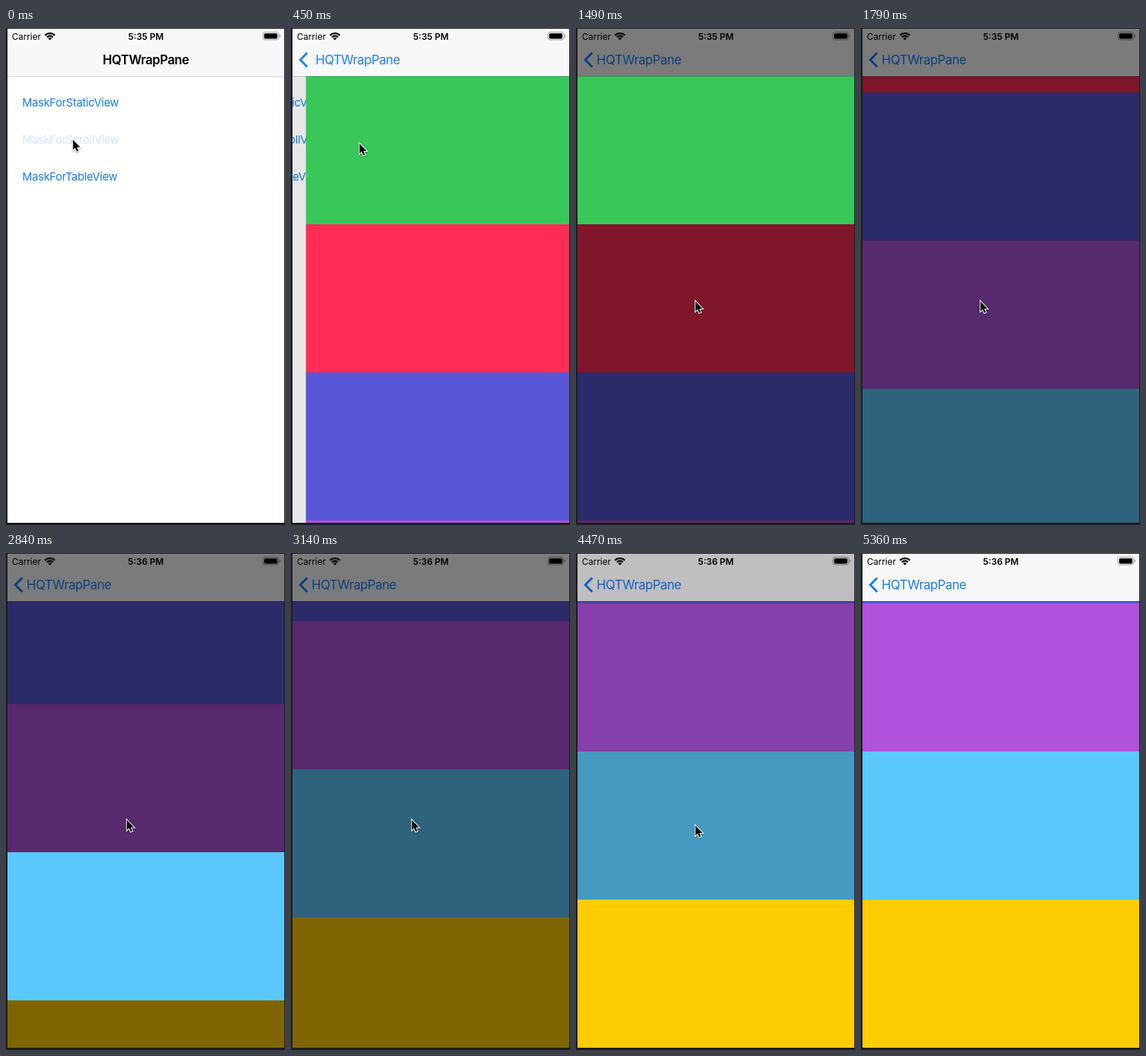
Recreate the animation shown at these times as an HTML page with a canvas. Size 378 by 671 pixels, loop 5.81 s.

```html
<!DOCTYPE html>
<html lang="en">
<head>
<meta charset="utf-8">
<title>Mask demo</title>
<style>
  html, body { margin: 0; width: 100%; height: 100%; overflow: hidden; background: #1c1c1e; }
  canvas { display: block; }
</style>
</head>
<body>
<canvas id="stage" width="378" height="671"></canvas>
<script>
const ctx = document.getElementById('stage').getContext('2d');

const LOOP = 5810, TICK = 150;
const SHORT_TICKS = [900, 2990, 3580, 4620]; // these ticks last 10 ms less
const SCREEN = { x: 2, y: 1, w: 375, h: 667 };
const NAV_BOTTOM = 65, ROW = 200;
const TITLE = 'HQTWrapPane';
const BUTTONS = ['MaskForStaticView', 'MaskForScrollView', 'MaskForTableView'];
const ROW_COLORS = ['#3ac759', '#ff2d55', '#5856d6', '#af52de', '#5bc8fc', '#fecc03'];
const BLUE = '#157efb', BAR = '#f8f7f9';

// Pointer keys: tick, x, y
const POINTER = [
  [0, 90, 150], [1, 91, 152], [5, 93, 158], [6, 108, 205], [7, 142, 310], [8, 160, 366],
  [9, 160, 366], [10, 161, 368], [15, 161, 368], [19, 163, 359.5], [23, 163, 359.5],
  [24, 162, 363], [25, 161, 367], [32, 161, 367], [33, 178, 397], [34, 242, 522],
  [35, 324, 650], [36, 360, 700]
];

const clamp = v => Math.max(0, Math.min(1, v));
const mix = (a, b, p) => a + (b - a) * p;
const smooth = v => { const p = clamp(v); return p * p * (3 - 2 * p); };

function tickAt(time) {
  const skipped = SHORT_TICKS.filter(start => time >= start + TICK - 10).length;
  return Math.floor((time + 10 * skipped) / TICK);
}

function pushProgress(tick) {
  if (tick >= 4) return 1;
  const s = Math.max(0, tick - 0.3) * 1.77;
  return 1 - (1 + s) * Math.exp(-s);
}

function scrollAt(tick) {
  return 461 * smooth((tick - 10.54) / 2) + 136 * smooth((tick - 19.54) / 2);
}

function maskAlpha(tick) {
  return 0.5 * (smooth((tick - 3.62) / 1.67) - smooth((tick - 29.12) / 1.67));
}

// Index of the uncovered row, or -1 while the list scrolls
function openRow(tick) {
  if (tick < 11) return 0;
  if (tick < 13) return -1;
  if (tick < 20) return 4;
  return tick < 22 ? -1 : 5;
}

function pointerAt(tick) {
  const next = POINTER.findIndex(key => key[0] >= tick);
  if (next < 0) return [400, 720];
  if (next === 0) return POINTER[0].slice(1);
  const [t0, x0, y0] = POINTER[next - 1], [t1, x1, y1] = POINTER[next];
  const p = (tick - t0) / (t1 - t0);
  return [mix(x0, x1, p), mix(y0, y1, p)];
}

function rect(color, x, y, w, h) {
  ctx.fillStyle = color;
  ctx.fillRect(x, y, w, h);
}

function label(text, x, y, size, { weight = 400, color = '#000', align = 'left', spacing = 0, alpha = 1 } = {}) {
  ctx.save();
  ctx.globalAlpha *= alpha;
  ctx.font = `${weight} ${size}px Inter, sans-serif`;
  ctx.letterSpacing = spacing + 'px';
  ctx.textAlign = align;
  ctx.fillStyle = color;
  ctx.fillText(text, x, y);
  ctx.restore();
}

function roundRect(x, y, w, h, r) {
  ctx.beginPath();
  ctx.roundRect(x, y, w, h, r);
}

function drawMenu(push) {
  ctx.save();
  ctx.translate(-0.3 * SCREEN.w * push, 0);
  rect('#fff', SCREEN.x, SCREEN.y, SCREEN.w, SCREEN.h);
  BUTTONS.forEach((text, i) => label(text, 22, 105.5 + 50 * i, 15, {
    color: BLUE, spacing: -0.25, alpha: i === 1 && push === 0 ? 0.2 : 1
  }));
  rect(`rgba(0,0,0,${0.1 * push})`, SCREEN.x, SCREEN.y, SCREEN.w, SCREEN.h);
  ctx.restore();
}

function drawRows(push, scroll) {
  const x = SCREEN.x + SCREEN.w * (1 - push);
  ROW_COLORS.forEach((color, i) => rect(color, x, Math.round(NAV_BOTTOM + ROW * i - scroll), SCREEN.w, ROW));
}

function drawStatus(clock) {
  label('Carrier', 8, 15.5, 12);
  label(clock, 189.5, 15.5, 12, { weight: 600, align: 'center' });

  ctx.fillStyle = ctx.strokeStyle = '#000';
  ctx.lineWidth = 2.2;
  const from = -Math.PI * 0.75, to = -Math.PI * 0.25;
  for (const r of [5.8, 9.4]) {
    ctx.beginPath();
    ctx.arc(59.5, 16.5, r, from, to);
    ctx.stroke();
  }
  ctx.beginPath();
  ctx.moveTo(59.5, 16.5);
  ctx.arc(59.5, 16.5, 3.5, from, to);
  ctx.fill();

  ctx.lineWidth = 1;
  ctx.strokeStyle = 'rgba(0,0,0,.35)';
  roundRect(348, 5.5, 21.5, 10.5, 3);
  ctx.stroke();
  roundRect(349.7, 7.2, 18, 7.2, 1.6);
  ctx.fill();
  rect('rgba(0,0,0,.4)', 370.5, 9, 1.2, 3.6);
}

function drawNav(push, clock) {
  rect(BAR, SCREEN.x, SCREEN.y, SCREEN.w, NAV_BOTTOM - SCREEN.y);
  rect('rgba(0,0,0,.3)', SCREEN.x, NAV_BOTTOM, SCREEN.w, 0.6);
  drawStatus(clock);

  const slide = mix(0, -106, push);
  if (push < 1) {
    label(TITLE, 189.5 + slide, 49, 17, { weight: 600, align: 'center', spacing: -0.4, alpha: 1 - push });
  }
  if (push > 0) {
    label(TITLE, 134 + slide, 49, 17, { color: BLUE, spacing: -0.4, alpha: push });
    ctx.save();
    ctx.globalAlpha = push;
    ctx.strokeStyle = BLUE;
    ctx.lineWidth = 3;
    ctx.beginPath();
    ctx.moveTo(22, 33.5);
    ctx.lineTo(12.6, 43);
    ctx.lineTo(22, 52.5);
    ctx.stroke();
    ctx.restore();
  }
}

function drawMask(alpha, row, scroll) {
  if (alpha <= 0) return;
  ctx.beginPath();
  ctx.rect(SCREEN.x, SCREEN.y, SCREEN.w, SCREEN.h);
  if (row >= 0) ctx.rect(SCREEN.x, Math.round(NAV_BOTTOM + ROW * row - scroll), SCREEN.w, ROW);
  ctx.fillStyle = `rgba(0,0,0,${alpha})`;
  ctx.fill('evenodd');
}

function drawPointer([x, y]) {
  ctx.save();
  ctx.translate(x, y);
  ctx.beginPath();
  [[0.8, 1], [0.8, 14.6], [3.8, 11.8], [6, 16.8], [8.2, 15.8], [6, 11], [10.4, 11]]
    .forEach(([px, py]) => ctx.lineTo(px, py));
  ctx.closePath();
  ctx.shadowColor = 'rgba(0,0,0,.35)';
  ctx.shadowBlur = 2;
  ctx.shadowOffsetY = 1;
  ctx.strokeStyle = '#fff';
  ctx.lineWidth = 2;
  ctx.stroke();
  ctx.shadowColor = 'transparent';
  ctx.fillStyle = '#000';
  ctx.fill();
  ctx.restore();
}

function draw(tick) {
  const push = pushProgress(tick), scroll = scrollAt(tick);
  rect('#1c1c1e', 0, 0, 378, 671);
  ctx.save();
  ctx.beginPath();
  ctx.rect(SCREEN.x, SCREEN.y, SCREEN.w, SCREEN.h);
  ctx.clip();
  if (push < 1) drawMenu(push);
  if (push > 0) drawRows(push, scroll);
  drawNav(push, tick < 14 ? '5:35 PM' : '5:36 PM');
  drawMask(maskAlpha(tick), openRow(tick), scroll);
  ctx.restore();
  drawPointer(pointerAt(tick));
}

const start = performance.now();
function loop() {
  draw(tickAt((performance.now() - start) % LOOP));
  requestAnimationFrame(loop);
}
loop();
</script>
</body>
</html>
```
